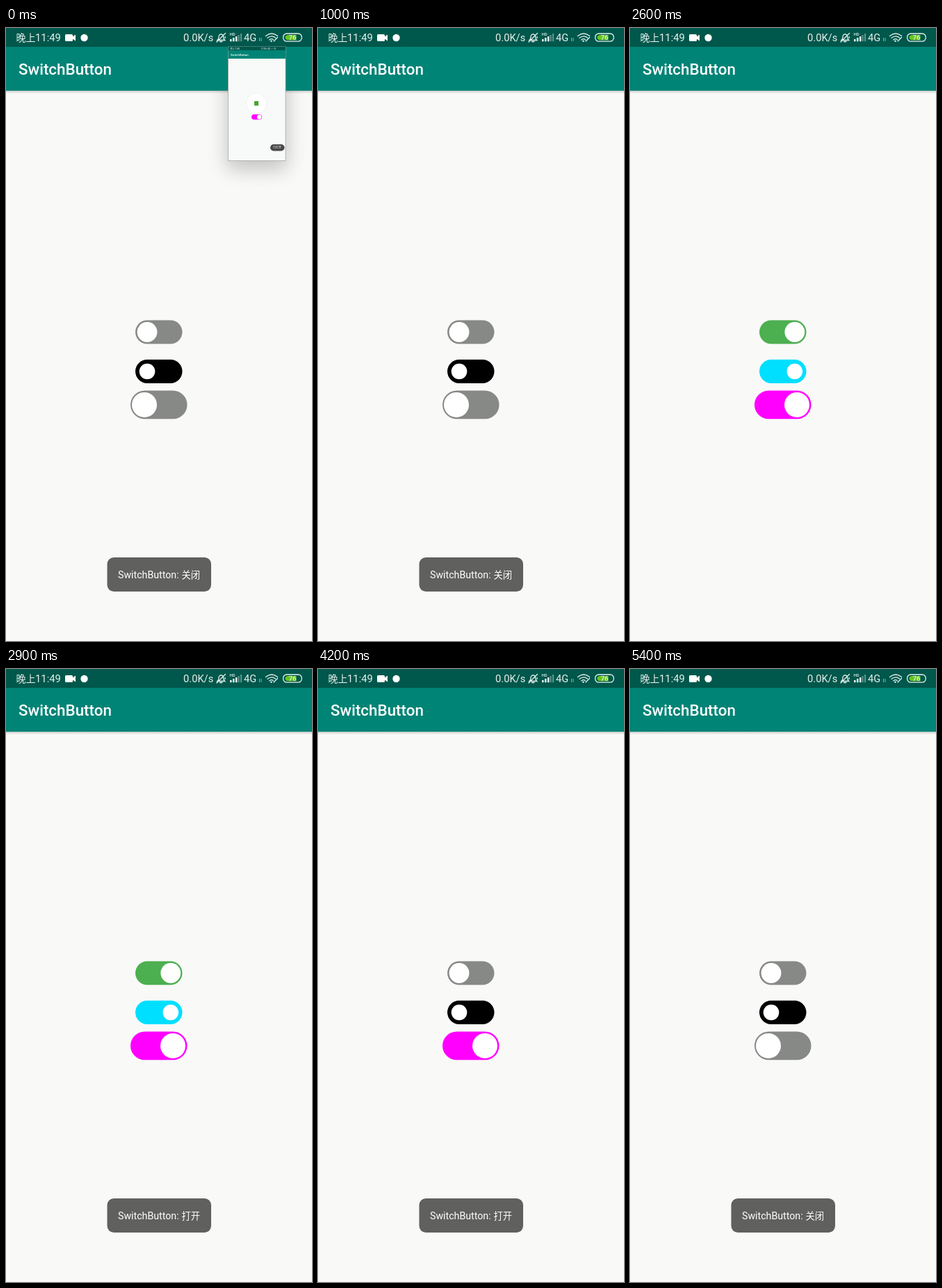
An HTML page that plays this animation: 440x880 px, repeating every 6000 ms.

```html
<!DOCTYPE html>
<html lang="zh">
<head>
<meta charset="utf-8">
<title>SwitchButton</title>
<style>
html, body { margin: 0; width: 100%; height: 100%; overflow: hidden; background: #f9faf8; }
svg { display: block; width: 440px; height: 880px; }
text { font-family: Roboto, "Noto Sans CJK SC", "Noto Sans CJK", sans-serif; fill: #fff; }
.status text { fill: #e6f1ef; }
.line { fill: none; stroke: #e6f1ef; stroke-width: 1.3; stroke-linecap: round; }
</style>
</head>
<body>
<svg viewBox="0 0 440 880">
  <defs>
    <linearGradient id="edge" x1="0" y1="0" x2="0" y2="1">
      <stop offset="0" stop-color="#000" stop-opacity=".2"/>
      <stop offset="1" stop-color="#000" stop-opacity="0"/>
    </linearGradient>
    <filter id="blur" x="-60%" y="-40%" width="220%" height="180%">
      <feGaussianBlur stdDeviation="14"/>
    </filter>
    <clipPath id="page"><rect y="90" width="440" height="790"/></clipPath>
  </defs>

  <rect width="440" height="880" fill="#f9faf8"/>
  <rect y="90" width="440" height="4" fill="url(#edge)"/>
  <rect y="27" width="440" height="63" fill="#008476"/>
  <rect width="440" height="27" fill="#00574b"/>
  <text x="18" y="67" font-size="22.4" font-weight="500">SwitchButton</text>

  <g class="status">
    <text x="14.5" y="19" font-size="14">晚上</text>
    <text x="42" y="19.3" font-size="14.8">11:49</text>
    <path d="M86.5 9h8q1.5 0 1.5 1.5v1.8l4-2.8v9l-4-2.8v1.8q0 1.5-1.5 1.5h-8q-1.500 0-1.500-1.500v-7q0-1.500 1.500-1.500z" fill="#fff"/>
    <circle cx="112.500" cy="14" r="5.200" fill="#fff"/>
    <text x="255" y="19.300" font-size="14.700">0.0K/s</text>
    <path class="line" d="M304 17.500q2-1.500 2-5q.3-3.500 3.300-3.700q3 .2 3.300 3.700q0 3.500 2 5zM307.500 19.500h3.500M303 20L315.500 7.500M315 12.500v2"/>
    <text x="321.500" y="11" font-size="6" font-weight="500">HD</text>
    <g fill="#e6f1ef">
      <path d="M322 16h2.600v3.200H322zM326 14h2.600v5.200H326zM330 12h2.400v7.200H330z"/>
      <path d="M333.500 10h2.200v9.200h-2.200zM337 8h2.200v11.200H337z" opacity=".4"/>
      <path d="M364 14h1v5h-1zM366.500 14h1v5h-1z" opacity=".6"/>
    </g>
    <text x="342" y="19.300" font-size="14.700">4G</text>
    <path class="line" stroke-width="1.600" d="M373.500 11.500q8.500-7 17 0M376 14.300q6-4.600 11.500-.3M378.800 17q3-2.500 5.500-.2M385 19l5.500-5.500"/>
    <circle cx="381.500" cy="18.800" r="1.200" fill="#e6f1ef"/>
    <rect class="line" x="398.600" y="8" width="26.600" height="11.200" rx="5"/>
    <path d="M406 10h11.500v7.200H406q-4.500 0-4.500-3.600t4.500-3.600z" fill="#66c51c"/>
    <text x="412" y="17" font-size="9.500" font-weight="500" text-anchor="middle">76</text>
  </g>

  <g id="switches"></g>

  <g id="toast">
    <rect x="145.500" y="760" width="149.500" height="49" rx="9.500" fill="#60605f"/>
    <text x="161" y="790" font-size="14.200">SwitchButton:</text>
    <text id="state" x="252.500" y="790" font-size="13.300"></text>
  </g>

  <g id="shot">
    <g clip-path="url(#page)">
      <rect x="318" y="50" width="86" height="153" fill="#000" opacity=".22" filter="url(#blur)"/>
    </g>
    <rect x="319.500" y="27" width="82.500" height="163.500" fill="#f8f9f9" stroke="#aaa" stroke-width=".8"/>
    <path d="M319.500 27h82.500v5h-82.500z" fill="#00574b"/>
    <path d="M319.500 32h82.500v12h-82.500z" fill="#008476"/>
    <text x="322.500" y="31.200" font-size="3">晚上11:48</text>
    <text x="367" y="31.200" font-size="3">0.1K/s 4G ▪ 76</text>
    <text x="323" y="39.800" font-size="4.300" font-weight="500">SwitchButton</text>
    <circle cx="360.200" cy="108.300" r="14.800" fill="#fff" stroke="#e7e9e8" stroke-width=".7"/>
    <rect x="357" y="105" width="6" height="6.500" fill="#43a82c"/>
    <rect x="353" y="124" width="15" height="7.500" rx="3.750" fill="#f0f"/>
    <circle cx="364.200" cy="127.750" r="3.200" fill="#fff"/>
    <rect x="380" y="167" width="20.500" height="9.500" rx="4.700" fill="#484848"/>
    <text x="384" y="173" font-size="4">已打开</text>
  </g>
</svg>
<script>
const LOOP = 6000, STEP = 100, SLIDE = 300;
const $ = id => document.getElementById(id);
const clamp = v => Math.min(1, Math.max(0, v));
const phase = (t, start, len) => clamp((t - start) / len);
const ease = p => (1 - Math.cos(Math.PI * p)) / 2;

const switches = [
  { x: 186, y: 419.5, w: 67.5, h: 34, r: 14.4, left: 203, right: 236.8, off: '#878986', on: '#4caf50', open: 1220, close: 3050 },
  { x: 186, y: 476, w: 67.5, h: 34, r: 11.3, left: 203, right: 236.8, off: '#000', on: '#00dfff', open: 1840, close: 3740 },
  { x: 179, y: 520.5, w: 81.5, h: 40.8, r: 18, left: 199, right: 240, off: '#878986', on: '#f0f', open: 2300, close: 4430 }
];

function add(tag, attrs) {
  const el = document.createElementNS('http://www.w3.org/2000/svg', tag);
  for (const k in attrs) el.setAttribute(k, attrs[k]);
  return $('switches').appendChild(el);
}

for (const s of switches) {
  s.track = add('rect', { x: s.x, y: s.y, width: s.w, height: s.h, rx: s.h / 2 });
  s.knob = add('circle', { cy: s.y + s.h / 2, r: s.r, fill: '#fff' });
}

// The track takes its new colour only once the knob has arrived.
function drawSwitch(s, t) {
  const pos = ease(phase(t, s.open, SLIDE)) - ease(phase(t, s.close, SLIDE));
  const on = t >= s.open + SLIDE && t < s.close + SLIDE;
  s.knob.setAttribute('cx', s.left + (s.right - s.left) * pos);
  s.track.setAttribute('fill', on ? s.on : s.off);
}

const toasts = [
  { from: -1000, to: 1150, text: '关闭' },
  { from: 2600, to: 4420, text: '打开' },
  { from: 4730, to: LOOP, text: '关闭' }
];

function drawToast(t) {
  const cur = toasts.filter(o => t >= o.from).pop();
  const enter = phase(t, cur.from, 300);
  const dy = 80 * (1 - enter) ** 4;
  $('state').textContent = cur.text;
  $('toast').setAttribute('opacity', enter * (1 - phase(t, cur.to, 220)));
  $('toast').setAttribute('transform', `translate(0 ${dy})`);
}

function drawShot(t) {
  const p = phase(t, 430, 400);
  $('shot').setAttribute('transform', `translate(0 ${-260 * ease(p)})`);
  $('shot').setAttribute('visibility', p < 1 ? 'visible' : 'hidden');
}

const start = performance.now();
function draw() {
  const now = (performance.now() - start) % LOOP;
  const t = Math.floor(now / STEP) * STEP;
  for (const s of switches) drawSwitch(s, t);
  drawToast(t);
  drawShot(t);
  requestAnimationFrame(draw);
}
draw();
</script>
</body>
</html>
```
